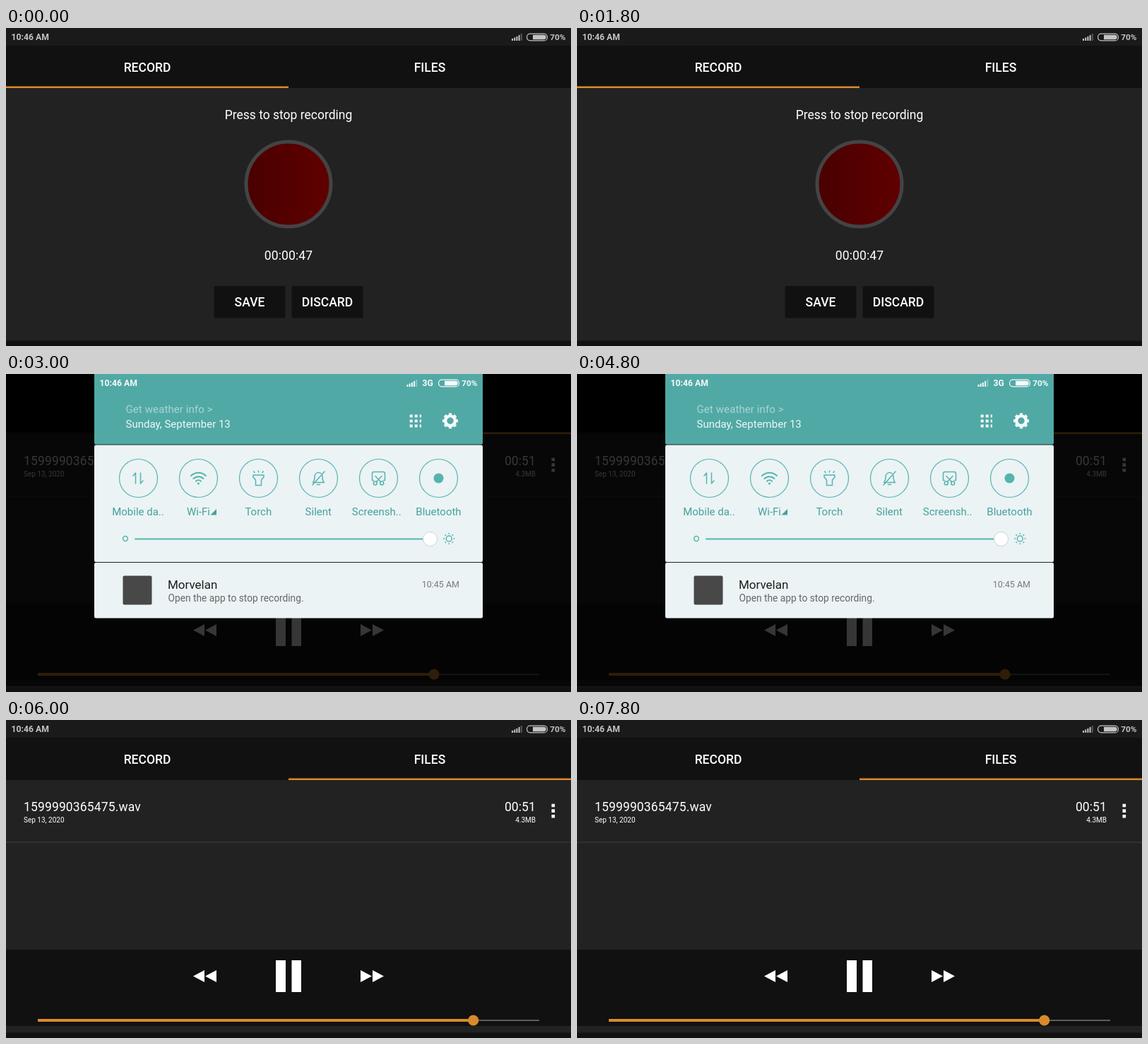
An HTML page for the animation above (9 s loop, 800 by 450 pixels).

```html
<!DOCTYPE html>
<html lang="en">
<head>
<meta charset="utf-8">
<title>Voice recorder</title>
<style>
  html, body { margin: 0; width: 100%; height: 100%; overflow: hidden; background: #222; }
  svg { display: block; width: 800px; height: 450px; font: 17.5px Roboto, sans-serif; }
  .mid { text-anchor: middle; }
  .end { text-anchor: end; }
  .tab { font-weight: 500; text-anchor: middle; }
  .small { font-size: 10px; }
  .status { font-weight: 700; font-size: 12.2px; }
  .panel { font-size: 15px; }
  .line { fill: none; stroke: #58b3ae; stroke-width: 1.5; stroke-linecap: round; stroke-linejoin: round; }
</style>
</head>
<body>
<svg viewBox="0 0 800 450" fill="#fff">
  <defs>
    <linearGradient id="red">
      <stop stop-color="#490000"/>
      <stop offset="1" stop-color="#600000"/>
    </linearGradient>
    <g id="signal">
      <path d="M0 15h2v3h-2zM3.2 13.5h2v4.5h-2zM6.4 12h2v6h-2zM9.6 10h2v8h-2z"/>
      <path d="M12.8 8h2v10h-2z" opacity=".35"/>
    </g>
    <g id="battery">
      <rect x=".6" y="8.1" width="28.8" height="9.8" rx="4.5" fill="none" stroke="currentColor" stroke-width="1.2"/>
      <path d="M9 9.8h15.5a3.2 3.2 0 0 1 0 6.4H9z"/>
    </g>
  </defs>

  <rect width="800" height="450" fill="#222"/>
  <rect width="800" height="25" fill="#1a1a1a"/>
  <rect y="25" width="800" height="60" fill="#111"/>
  <g fill="#c4c4c4" color="#c4c4c4" class="status">
    <text x="7.5" y="17">10:46 AM</text>
    <use href="#signal" x="716"/>
    <use href="#battery" x="737"/>
    <text x="792.5" y="17" class="end" font-size="11.8">70%</text>
  </g>
  <text x="200" y="62" class="tab">RECORD</text>
  <text x="600" y="62" class="tab">FILES</text>
  <rect id="underline" y="82.5" width="400" height="2.5" fill="#d98a2b"/>

  <g id="record">
    <text x="400" y="129" class="mid">Press to stop recording</text>
    <circle cx="400" cy="221" r="60" fill="url(#red)" stroke="#444" stroke-width="5"/>
    <text x="400" y="327.5" class="mid" letter-spacing=".12">00:00:47</text>
    <rect x="294.5" y="365" width="101" height="45.5" rx="2.5" fill="#111"/>
    <rect x="404.5" y="365" width="101" height="45.5" rx="2.5" fill="#111"/>
    <text x="345" y="394" class="tab">SAVE</text>
    <text x="455" y="394" class="tab">DISCARD</text>
  </g>

  <g id="files">
    <text x="25" y="129" letter-spacing=".14">1599990365475.wav</text>
    <text x="25" y="144.5" class="small">Sep 13, 2020</text>
    <text x="750" y="129" class="end" letter-spacing=".1">00:51</text>
    <text x="750" y="144.5" class="end small">4.3MB</text>
    <path d="M772.5 118.7h4.6v4.6h-4.6zm0 7.6h4.6v4.6h-4.6zm0 7.6h4.6v4.6h-4.6z"/>
    <rect y="172.4" width="800" height="1.2" fill="#3c3c3c"/>
    <rect y="325" width="800" height="108" fill="#111"/>
    <path d="M281 354v17l-16-8.5zM298 354v17l-16-8.5zM502 354v17l16-8.5zM519 354v17l16-8.5z"/>
    <path d="M382 340h14v45h-14zM404.5 340h13.5v45h-13.5z"/>
    <rect x="45" y="424.3" width="710" height="1.5" fill="#777"/>
    <rect id="played" x="45" y="423" height="4" fill="#d98a2b"/>
    <circle id="knob" cy="425" r="7.6" fill="#d98a2b"/>
  </g>

  <g id="shade">
    <rect width="800" height="442" fill="#000" opacity=".79"/>
    <rect width="125" height="25"/>
    <path d="M0 0H800V82H0z" fill="#000"/>
    <rect x="125" width="550" height="345" rx="3" fill="#1d2626"/>
    <path d="M125 0H675V97q0 2.5-2.5 2.5H127.5q-2.5 0-2.5-2.5z" fill="#51a9a5"/>
    <g fill="#ebf3f5">
      <rect x="125" y="100.4" width="550" height="165.6" rx="2.5"/>
      <rect x="125" y="267" width="550" height="78.5" rx="2.5"/>
    </g>
    <g class="status" fill="#f4fafa" color="#f4fafa">
      <text x="132.5" y="17">10:46 AM</text>
      <use href="#signal" x="567.5"/>
      <text x="589.5" y="17">3G</text>
      <use href="#battery" x="612"/>
      <text x="667.5" y="17" class="end" font-size="11.8">70%</text>
    </g>
    <g class="panel">
      <text x="169.5" y="55" fill="#a9d5d3" letter-spacing=".1">Get weather info &gt;</text>
      <text x="169.5" y="75.5" fill="#eef7f7">Sunday, September 13</text>
    </g>
    <path d="M573.7 59.5H590M573.7 66.5H590M573.7 73.5H590" stroke="#f4fafa" stroke-width="4" stroke-dasharray="4 3" transform="translate(-2)"/>
    <g fill="none" stroke="#f4fafa">
      <circle cx="629" cy="66.3" r="6.9" stroke-width="4.4"/>
      <circle cx="629" cy="66.3" r="9.6" stroke-width="2.8" pathLength="16" stroke-dasharray="1.1 .9" stroke-dashoffset=".55"/>
    </g>

    <g id="toggles" class="panel mid" fill="#47a19c"></g>
    <path d="M298 191v8.5h-8.5z" fill="#47a19c"/>
    <g class="line">
      <path d="M183.5 155V140l-3.5 4M190.5 140v15l3.5-4"/>
      <path d="M262 144a15 15 0 0 1 21 0M265.5 148a10 10 0 0 1 14 0M269 151.7a5 5 0 0 1 7 0" stroke-width="2"/>
      <circle cx="272.5" cy="155" r=".8"/>
      <path d="M350 143h15v3l-3.5 4v7.5h-8V150l-3.5-4zM357.5 139v-2M352 139.5l-1.2-1.7M363 139.5l1.2-1.7"/>
      <path d="M434.5 153.5c2-2 2.5-4 2.5-8 0-8 11-8 11 0 0 4 .5 6 2.5 8zM440.5 156.5h4M451 138l-17 19"/>
      <path d="M520.5 150.5h-2V141q0-2.5 2.5-2.5h13q2.5 0 2.5 2.5v9.5h-2M523 144.5l7.5 8M532 144.5l-7.5 8"/>
      <circle cx="522.8" cy="154.5" r="2.5"/>
      <circle cx="532.2" cy="154.5" r="2.5"/>
      <circle cx="169" cy="233" r="3.4"/>
      <path d="M183 233.5H600" stroke-width="2"/>
      <circle cx="627.3" cy="233" r="4"/>
      <circle cx="627.3" cy="233" r="7.2" pathLength="16" stroke-dasharray=".3 1.7" stroke-dashoffset=".15"/>
    </g>
    <circle cx="612.5" cy="147.5" r="7" fill="#58b3ae"/>
    <circle cx="600.5" cy="233.5" r="10" stroke="#c9d3d5"/>

    <rect x="165.5" y="285.5" width="41" height="41" rx="2" fill="#484848"/>
    <text x="229" y="304" font-size="17" fill="#1c1c1c">Morvelan</text>
    <text x="229.5" y="321.5" font-size="13.75" fill="#666">Open the app to stop recording.</text>
    <text x="642" y="302" font-size="12.5" class="end" fill="#7a7a7a">10:45 AM</text>
  </g>

  <rect y="442.5" width="800" height="8" fill="#111"/>
</svg>
<script>
  const el = id => document.getElementById(id);
  const show = (id, on) => el(id).style.display = on ? '' : 'none';

  const toggles = [
    ['Mobile da..', 187], ['Wi-Fi', 272.5], ['Torch', 357.3],
    ['Silent', 442.3], ['Screensh..', 524.7], ['Bluetooth', 612.5],
  ];
  el('toggles').innerHTML = toggles.map(([label, x], i) =>
    `<circle class="line" cx="${187.5 + 85 * i}" cy="147.5" r="27" style="stroke-width:1.2"/>
     <text x="${x}" y="199.5">${label}</text>`).join('');

  const STEP = 3000;

  function draw() {
    const scene = Math.floor(performance.now() / STEP) % 3;
    const position = scene === 1 ? 606 : 661.7;
    show('record', scene === 0);
    show('files', scene > 0);
    show('shade', scene === 1);
    el('underline').setAttribute('x', scene ? 400 : 0);
    el('played').setAttribute('width', position - 45);
    el('knob').setAttribute('cx', position);
    requestAnimationFrame(draw);
  }
  draw();
</script>
</body>
</html>
```
